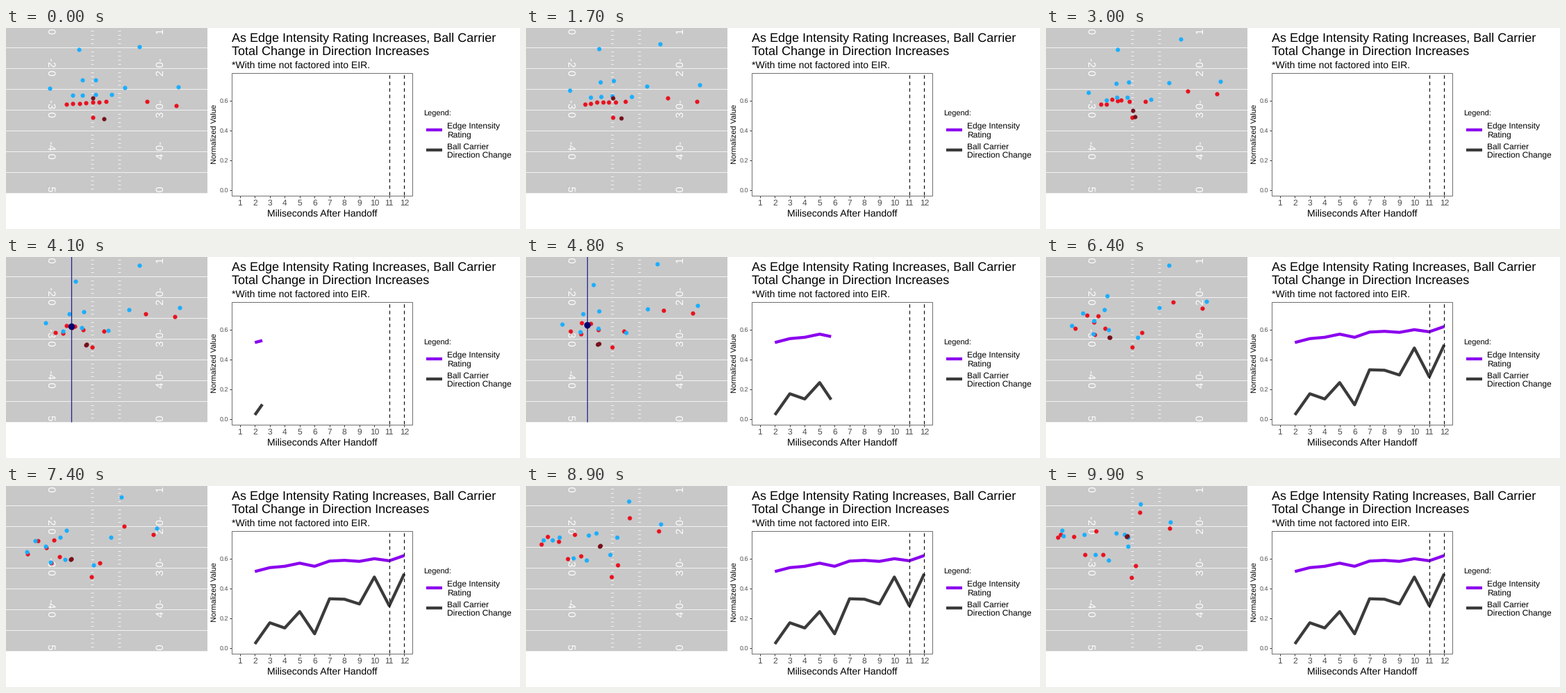
These frames come from a looping animation (740x290 px, 10000 ms). A matplotlib script:

```python
import numpy as np
import matplotlib.pyplot as plt
from matplotlib.animation import FuncAnimation
from matplotlib.patches import Rectangle

plt.rcParams["font.family"] = "Liberation Sans"
plt.rcParams["text.hinting"] = "no_hinting"

W, H, DPI = 740, 290, 100
FRAMES, INTERVAL = 100, 100
PT = 72 / DPI  # points per pixel
NUDGE = 0.7    # view offset that centres strokes on pixels

GREY, BLUE, RED, MAROON = "#c8c8c8", "#1aaeff", "#e8121f", "#77101a"
NAVY, PURPLE, CHARCOAL, TICK = "#000073", "#8b00ee", "#3b3b3b", "#4d4d4d"

SNAP, HANDOFF, CAUGHT = 18, 37, 41   # ball events
SHOW, SWITCH, HIDE = 40, 49, 61      # edge marker events

# When a route passes its waypoints, by number of waypoints
TIMES = {2: (0, 99), 3: (0, 50, 99), 4: (0, 41, 74, 99),
         5: (0, 38, 56, 74, 99)}

DEFENCE = [
    [(106, 32), (101, 35.5), (88, 64.5), (114, 71)],
    [(64, 88), (57.5, 96), (30.5, 96), (24, 65)],
    [(110.5, 76), (92, 82.5), (43, 80), (56, 70.5)],
    [(130, 75.5), (112.5, 79.5), (79, 75), (101.5, 68.5)],
    [(97, 98), (83, 107.5), (65, 111), (72, 99.5)],
    [(111, 98), (95, 100.5), (57.5, 88), (26, 72.5)],
    [(130, 97), (110, 103), (86, 107), (91, 108)],
    [(153, 97), (148, 107), (127, 115), (119, 88)],
    [(193, 28), (189, 11), (137, 26.5)],
    [(172, 87), (175, 75), (119, 75)],
    [(249, 85.5), (246, 70), (180, 52.5)],
]
EDGE_BEFORE, EDGE_AFTER = 5, 4       # defenders marked as the edge

# Linemen start evenly spaced along the line of scrimmage
BLOCKS = [
    [(72, 109.5), (31.5, 98.5), (18, 75)],
    [(83, 111), (66, 112), (57, 100)],
    [(87.5, 99.5), (47, 79.5), (22, 71)],
    [(95.5, 103), (59, 89.5), (41, 74)],
    [(100, 101), (69.5, 79), (73, 66)],
    [(112, 106), (78, 103), (82.5, 100)],
    [(141, 108), (130, 116)],
]
OFFENCE = [[(87.5 + 9.5 * k, 110.5 - 0.6 * k)] + r
           for k, r in enumerate(BLOCKS)]
OFFENCE += [
    [(204, 107), (197, 76), (136, 39)],
    [(246, 113), (239, 81), (178.5, 62)],
]
PASSER = [(125.5, 129.5), (123.5, 132.5)]
CARRIER = [(141.5, 132), (121, 127.5), (95, 122.5), (95, 106), (118, 73)]

# Chart series, for x = 2 .. 12
STEPS = np.arange(2, 13)
RATING = [.516, .542, .551, .572, .551, .586, .591, .584, .602, .588, .623]
TURNING = [.03, .172, .137, .247, .098, .333, .330, .298, .479, .286, .5]

T = np.arange(FRAMES)


def route(points):
    """Position in every frame: a cubic Hermite path that starts at rest."""
    p = np.array(points, float)
    keys = np.array(TIMES[len(p)], float)
    slope = np.gradient(p, keys, axis=0)
    slope[0] = 0
    k = np.clip(np.searchsorted(keys, T, side="right") - 1, 0, len(p) - 2)
    h = (keys[k + 1] - keys[k])[:, None]
    u = (T - keys[k])[:, None] / h
    ease = u * u * (3 - 2 * u)
    return (p[k] + ease * (p[k + 1] - p[k])
            + u * (1 - u) ** 2 * h * slope[k]
            - u * u * (1 - u) * h * slope[k + 1])


def blend(a, b, start, end):
    u = np.clip((T - start) / (end - start), 0, 1)[:, None]
    return a + (b - a) * u


def cx(x):
    return 337.5 + 21.5 * (x - 1)


def cy(y):
    return 235 - 215 * y


fig = plt.figure(figsize=(W / DPI, H / DPI), dpi=DPI, facecolor="white")
ax = fig.add_axes([0, 0, 1, 1])
ax.set_xlim(NUDGE, W + NUDGE)
ax.set_ylim(H + NUDGE, NUDGE)
ax.axis("off")


def text(x, y, s, size, color="black", **kw):
    return ax.text(x, y + NUDGE, s, fontsize=size * PT, color=color, **kw)


def line(xs, ys, color, width, **kw):
    return ax.plot(xs, ys, color=color, lw=width * PT,
                   solid_capstyle="butt", **kw)[0]


def dots(color, size, z):
    return ax.scatter([], [], s=(size * PT) ** 2, c=color, linewidths=0,
                      zorder=z)


def draw_field():
    right, bottom = 290 + NUDGE, 238 + NUDGE
    ax.add_patch(Rectangle((0, 0), right, bottom, fc=GREY, lw=0, zorder=0))
    for y in np.arange(28.5, bottom, 30):
        line([0, right], [y, y], "#f2f2f2", 1, zorder=1)
    for x in (124.5, 164):
        for y in np.arange(4.5, bottom, 6):
            line([x - 2, x + 2], [y, y], "#f2f2f2", 1, zorder=1)
    clip = Rectangle((0, 0), right, bottom, transform=ax.transData)
    for tens, y in ((1, -1.5), (2, 56), (3, 116), (4, 176), (5, 238.5)):
        dash = "-" if 1 < tens < 5 else ""
        for x, s, angle in ((64.8, f"{dash}{tens} 0", -90),
                            (223.8, f"{tens} 0{dash}", 90)):
            label = text(x, y, s, 15, "white", rotation=angle, zorder=1,
                         ha="center", va="center", clip_on=True)
            label.set_clip_path(clip)


def draw_chart():
    text(325.5, 19, "As Edge Intensity Rating Increases, Ball Carrier", 18)
    text(325.5, 38, "Total Change in Direction Increases", 18)
    text(325.5, 58, "*With time not factored into EIR.", 14)
    ax.add_patch(Rectangle((326, 65.5), 259.5, 177, fill=False, ec="#707070",
                           lw=PT, zorder=6))
    for x in range(1, 13):
        line([cx(x)] * 2, [243, 246], "#333333", 1)
        text(cx(x), 256, str(x), 12, TICK, ha="center")
    for y in (0, .2, .4, .6):
        line([323, 326], [cy(y)] * 2, "#333333", 1)
        text(321, cy(y) + 2.3, f"{y:.1f}", 9, TICK, ha="right")
    text(456, 272, "Miliseconds After Handoff", 14, ha="center")
    text(302, 153.5, "Normalized Value", 11, rotation=90, ha="center",
         va="center")
    for x in (11, 12):
        line([cx(x)] * 2, [242, 66], "black", 1.1, zorder=5,
             dashes=(4.5, 4), dash_capstyle="butt")

    text(602, 127, "Legend:", 11)
    rows = ((148, PURPLE, "Edge Intensity", "Rating"),
            (176.5, CHARCOAL, "Ball Carrier", "Direction Change"))
    for y, color, top, bottom in rows:
        line([605.5, 628.5], [y, y], color, 4.3)
        text(636, y - 2, top, 12)
        text(636, y + 11, bottom, 12)


draw_field()
draw_chart()

passer, carrier = route(PASSER), route(CARRIER)
ball = blend(np.array([126, 101.5]), passer, SNAP, HANDOFF)
ball = blend(ball, carrier + [-1.2, 0.8], HANDOFF, CAUGHT)

blue_path = np.stack([route(r) for r in DEFENCE], axis=1)
red_path = np.stack([route(r) for r in OFFENCE] + [passer], axis=1)
dark_path = np.stack([carrier, ball], axis=1)

squads = [(dots(RED, 6.2, 2), red_path),
          (dots(BLUE, 6.2, 3), blue_path),
          (dots(MAROON, 6.2, 4), dark_path)]
edge_dot = dots(NAVY, 9.4, 6)
edge_line = line([], [], "#24248c", 1.3, zorder=5)
curves = [(line([], [], PURPLE, 4.3, zorder=3), RATING),
          (line([], [], CHARCOAL, 4.3, zorder=3), TURNING)]


def reveal(curve, vals, end):
    if end < STEPS[0]:
        curve.set_data([], [])
        return
    end = min(end, STEPS[-1])
    xs = np.append(STEPS[STEPS < end], end)
    curve.set_data(cx(xs), cy(np.interp(xs, STEPS, vals)))


def update(i):
    for squad, path in squads:
        squad.set_offsets(path[i])

    x, y = blue_path[i, EDGE_BEFORE if i < SWITCH else EDGE_AFTER]
    edge_dot.set_offsets([[x, y]])
    edge_line.set_data([x, x], [0, 238 + NUDGE])
    for mark in (edge_dot, edge_line):
        mark.set_visible(SHOW <= i <= HIDE)

    for curve, vals in curves:
        reveal(curve, vals, 2.5 + (i - 41) * 7 / 15)
    return [s for s, _ in squads] + [edge_dot, edge_line] + [c for c, _ in curves]


anim = FuncAnimation(fig, update, frames=FRAMES, interval=INTERVAL,
                     repeat=True, repeat_delay=0, blit=False)
plt.show()
```
